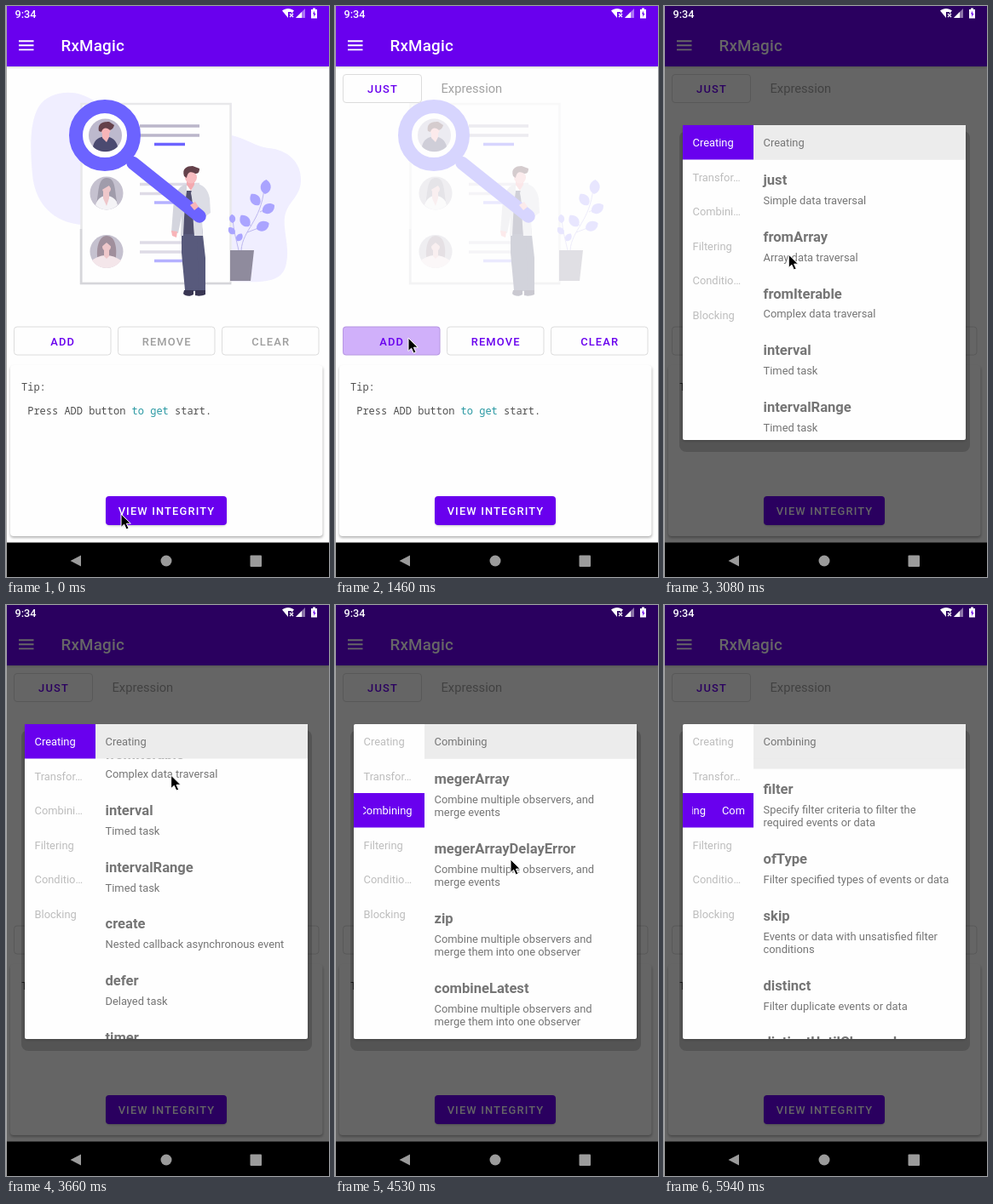
These frames come from a looping animation (379x671 px, 6040 ms). An HTML page:

```html
<!DOCTYPE html>
<html lang="en">
<head>
<meta charset="utf-8">
<title>RxMagic</title>
<style>
html, body { margin: 0; width: 100%; height: 100%; overflow: hidden; background: #fefefe; }
svg { display: block; width: 100vw; height: 100vh; font: 12.9px Roboto, sans-serif; }
text { white-space: pre; }
.btn { font-weight: 500; letter-spacing: 1.15px; text-anchor: middle; fill: #6900ee; }
.mono { font: 12px "Noto Sans Mono", monospace; fill: #505050; }
.box { fill: #fefefe; stroke: #dcdcdc; }
.name { font-size: 16.6px; font-weight: 700; }
#list, #sticky { fill: #757575; }
</style>
</head>
<body>
<svg viewBox="0 0 379 671">
  <defs>
    <clipPath id="listClip"><rect x="105" y="140" width="249" height="370"/></clipPath>
    <clipPath id="tabClip"><rect x="33" y="221" width="61.5" height="41"/></clipPath>
    <filter id="blur" x="-10%" y="-10%" width="120%" height="130%"><feGaussianBlur stdDeviation="1.5"/></filter>
    <path id="leaf" d="M0 0C-8-3-8-13 0-17C8-13 8-3 0 0Z" fill="#aaa4ff"/>
  </defs>
  <rect width="379" height="671" fill="#fefefe"/>

  <g id="art">
    <path id="blob" d="M88 257C55 254 34 232 31 198C28 165 28 137 38 119C48 102 72 99 88 104C100 108 108 116 120 114H265V152C282 156 293 165 308 167C332 169 347 185 346 206C345 225 330 230 327 248C325 264 333 283 329 302C325 325 305 325 265 324V257Z" fill="#f0eeff"/>
    <rect x="88.500" y="115" width="175" height="211" fill="#fefefe" stroke="#e8e8ea" stroke-width="2.500"/>
    <path d="M88 262V326H264" fill="none" stroke="#d6d6da" stroke-width="2.500"/>
    <g id="rows"></g>
    <g>
      <circle cx="118" cy="220" r="19.500" fill="#c5c1cf"/>
      <path d="M106 233C109 222 107 202 118 202C130 202 127 220 131 233Z" fill="#a09cab"/>
      <path d="M105 234C107 226 113 223 118 223C124 223 130 227 131 234C124 241 112 241 105 234Z" fill="#f4f3f6"/>
      <path d="M114 217h7v9l-3 9-4-9Z" fill="#eec7ca"/><circle cx="118" cy="215" r="5" fill="#eec7ca"/>
      <path d="M111 217C109 203 126 203 125 217L121 211Z" fill="#a09cab"/>
    </g>
    <g>
      <circle cx="118" cy="288.500" r="19.500" fill="#c5c1cf"/>
      <path d="M108 300C105 288 108 270 118 270C129 270 131 287 128 300Z" fill="#a08f9c"/>
      <path d="M101 299C107 294 113 293 118 293C124 293 129 295 135 299C127 311 109 311 101 299Z" fill="#f4e6ea"/>
      <path d="M115 285h6v9l-3 3-3-3Z" fill="#eec7ca"/><circle cx="118" cy="283" r="5" fill="#eec7ca"/>
      <path d="M111 284C109 272 127 272 125 284L118 278Z" fill="#a08f9c"/>
    </g>
    <circle cx="116.500" cy="152" r="27" fill="#fefefe"/>
    <circle cx="116.500" cy="152" r="19.500" fill="#bdb9cd"/>
    <path d="M102 165C104 156 110 154 117 153C124 154 129 157 131 165C124 173 109 173 102 165Z" fill="#4b4a70"/>
    <path d="M113 147h8v7l-3 6-5-5Z" fill="#f7b5b8"/><circle cx="117" cy="146" r="5.500" fill="#f7b5b8"/>
    <path d="M109 147C107 137 115 136 121 136L127 140C126 144 124 145 122 146C119 143 114 142 112 148Z" fill="#64414a"/>
    <circle cx="116" cy="152" r="34" fill="none" stroke="#6c63ff" stroke-width="16"/>

    <path d="M263 287H291L287 323H263Z" fill="#8f8b9d"/>
    <path d="M276 287C278 262 299 254 303 214M273 287C270 274 267 264 266 250M283 266L296 261M288 259L283 253M298 242L306 238" fill="none" stroke="#bdb8ef"/>
    <g id="leaves"></g>

    <path d="M206 260H230L234 296V335H221L213 300L213 334H210L206 290Z" fill="#585a7c"/>
    <path d="M207 262H224L226 335H213L207 300Z" fill="#585a7c"/>
    <path d="M209 334H220V339C216 342 210 341 208 338ZM222 334H234V339C230 341 224 341 222 340Z" fill="#393653"/>
    <path d="M208 217H222L223 268H206Z" fill="#51506f"/>
    <path d="M212 209C201 212 197 222 196 240L194 266L202 267L206 247L205 270H208C209 248 210 231 212 218Z" fill="#d4d5de"/>
    <path d="M220 208C231 209 237 215 239 226L240 243L230 250L231 270H221C219 252 220 232 217 220Z" fill="#dcdde5"/>
    <path d="M212 200h9v10l-4 7-5-7Z" fill="#f4a9af"/><circle cx="217" cy="201.500" r="7" fill="#f8bcc0"/>
    <path d="M209 200C206 191 212 188 219 188L227 191C227 196 225 197 222 197C218 194 213 194 212 202Z" fill="#64414a"/>
    <path d="M194 264l7 1-1 7-5-2Z" fill="#f8b4b8"/>
    <path d="M149 184.500L227 247" stroke="#6c63ff" stroke-width="15.500" stroke-linecap="round"/>
    <path d="M216 234l6-4 4 6-5 4Z" fill="#f8b4b8"/>
  </g>

  <g id="row">
    <rect class="box" x="9.500" y="80.500" width="92" height="33" rx="3.500"/>
    <text class="btn" x="56" y="101.700">JUST</text>
    <text x="124.500" y="102.300" font-size="14.700" fill="#a2a2a2">Expression</text>
  </g>
  <rect id="justTint" x="9" y="80" width="93" height="34" rx="4" fill="#6900ee"/>

  <g id="buttons"></g>
  <rect id="addTint" x="9" y="376.500" width="114.500" height="34" rx="4" fill="#6900ee"/>

  <rect x="5" y="424" width="367" height="201" rx="4" opacity=".28" filter="url(#blur)"/>
  <rect x="5" y="422" width="366.500" height="201" rx="4" fill="#fefefe"/>
  <text class="mono" x="18" y="452">Tip:</text>
  <text class="mono" x="25.200" y="479.700">Press ADD button <tspan fill="#2b99a3">to get</tspan> start.</text>
  <rect x="118" y="579" width="140" height="31.500" rx="4" opacity=".3" filter="url(#blur)"/>
  <rect x="117" y="576" width="142" height="34" rx="4" fill="#6900ee"/>
  <text class="btn" x="188.500" y="598.200" style="fill:#fff">VIEW INTEGRITY</text>

  <rect y="66" width="379" height="6" opacity=".2" filter="url(#blur)"/>
  <rect width="379" height="71" fill="#6900ee"/>
  <path d="M15 41.200H32.500M15 46.300H32.500M15 51.400H32.500" stroke="#fff" stroke-width="1.900"/>
  <text x="64.500" y="53" font-size="18.800" font-weight="500" letter-spacing=".2" fill="#fff">RxMagic</text>
  <rect id="dim" x="1" width="378" height="631"/>

  <g id="dialog">
    <rect x="18" y="147" width="341" height="377" rx="8" opacity=".17"/>
    <rect x="22" y="142" width="332" height="369" rx="2" opacity=".2" filter="url(#blur)"/>
    <rect x="22" y="140" width="332" height="370" rx="2" fill="#fefefe"/>
    <rect id="tabFill" x="22" width="83" height="40.500" fill="#6900ee"/>
    <g id="tabs"></g>
    <g id="marquee" clip-path="url(#tabClip)" fill="#fff"><text y="246.200">Combining</text><text y="246.200">Combining</text></g>
    <g clip-path="url(#listClip)"><g id="list"></g></g>
    <rect x="105" y="140" width="249" height="40.500" fill="#ececec"/>
    <text id="sticky" x="116.500" y="165.300"></text>
  </g>

  <g fill="#fff">
    <text x="10.500" y="13.700" font-size="12.700" font-weight="500">9:34</text>
    <path d="M324 5.500C328 2 334 2 338 5.500L335 9V7H331V12L331 14Z"/>
    <path d="M333 9L337 13M337 9L333 13" stroke="#fff" stroke-width="1.300"/>
    <path d="M351 3V14H340Z" opacity=".45"/><path d="M347 7V14H340Z"/>
    <path d="M358 4h2v-1.500h3V4h2V14.500H358Z"/>
  </g>
  <path d="M362 5.500L360 9.500H361.300V13L363.500 8.700H362Z" fill="#6900ee"/>
  <rect y="630.500" width="379" height="40.500"/>
  <g fill="#9b9b9b"><path d="M75.500 652L88 645.500V658.500Z"/><circle cx="188" cy="652" r="6.500"/><rect x="286.500" y="645.500" width="13.500" height="13.500" rx="1"/></g>
  <path d="M.5 0V671" stroke="#a8a8a8"/>
  <path id="cursor" d="M0 0V15.500L3.600 12.200L6.200 18L9 16.800L6.400 11.200H11.300Z" stroke="#fff"/>
</svg>
<script>
const $ = id => document.getElementById(id);
const LOOP = 6040, TAB = 40.5, TOP = 140;

// "|" splits the lines of a description
const sections = {
  Creating: [
    ["just", "Simple data traversal"], ["fromArray", "Array data traversal"],
    ["fromIterable", "Complex data traversal"], ["interval", "Timed task"],
    ["intervalRange", "Timed task"], ["create", "Nested callback asynchronous event"],
    ["defer", "Delayed task"], ["timer", "Delayed task"], ["range", "Sequence of events"]],
  Transforming: [
    ["map", "Data type conversion"], ["flatMap", "Unordered event conversion"],
    ["concatMap", "Ordered event conversion"], ["buffer", "Cache events before sending"]],
  Combining: [
    ["megerArray", "Combine multiple observers, and|merge events"],
    ["megerArrayDelayError", "Combine multiple observers, and|merge events"],
    ["zip", "Combine multiple observers and|merge them into one observer"],
    ["combineLatest", "Combine multiple observers and|merge them into one observer"],
    ["combineLatestDelayError", "Combine multiple observers and|merge them into one observer"],
    ["reduce", "Aggregate events and send"], ["collect", "Collect events into a container"],
    ["startWith", "Add new events before each source|event"],
    ["count", "Summarize the number of events sent"]],
  Filtering: [
    ["filter", "Specify filter criteria to filter the|required events or data"],
    ["ofType", "Filter specified types of events or data"],
    ["skip", "Events or data with unsatisfied filter|conditions"],
    ["distinct", "Filter duplicate events or data"],
    ["distinctUntilChanged", "Filter consecutive duplicate events"]]
};

const label = (x, y, s, attr = "") => `<text x="${x}" y="${y}" ${attr}>${s}</text>`;
const offset = {};
let y = 0, html = "";
for (const [section, items] of Object.entries(sections)) {
  offset[section] = y;
  html += `<rect x="105" y="${y}" width="249" height="${TAB}" fill="#ececec"/>` + label(116.5, y + 25.3, section);
  y += TAB;
  for (const [name, desc] of items) {
    const lines = desc.split("|");
    html += label(116.5, y + 29.8, name, 'class="name"');
    lines.forEach((s, i) => html += label(116.5, y + 52.7 + 15 * i, s));
    y += lines.length > 1 ? 82 : 66.6;
  }
}
$("list").innerHTML = html;

$("tabs").innerHTML = ["Creating", "Transfor…", "Combini…", "Filtering", "Conditio…", "Blocking"]
  .map((s, i) => label(33.5, 165.3 + TAB * i, s, 'fill="#bdbdbd"')).join("");
const tabs = $("tabs").children;

$("buttons").innerHTML = ["ADD", "REMOVE", "CLEAR"].map((s, i) =>
  `<rect class="box" x="${9.5 + 122 * i}" y="377" width="113.5" height="33" rx="3.5"/>` +
  label(66.7 + 122 * i, 398.7, s, 'class="btn"')).join("");
const captions = $("buttons").querySelectorAll("text");

$("rows").innerHTML = [141, 209.5, 278].map((y, i) =>
  `<path d="M157 ${y}h70m-70 11h70" stroke="${i ? "#dedbe6" : "#bbb6ca"}" stroke-width="3.3"/>` +
  `<path d="M174 ${y + 21.5}h36" stroke="${i ? "#b5b1ff" : "#6c63ff"}" stroke-width="3.3"/>`).join("");

$("leaves").innerHTML = [[304, 221, 5, 1], [297, 234, -35, .95], [301, 242, 60, .95], [285, 259, -35, .95],
  [294, 262, 65, .95], [266, 255, -5, .6], [268, 268, -40, .6], [271, 276, 35, .6]]
  .map(([x, y, a, s]) => `<use href="#leaf" transform="translate(${x} ${y}) rotate(${a}) scale(${s})"/>`).join("");

const path = [[50, 135, 597], [640, 204, 476], [1020, 86, 390], [1850, 86, 390], [2260, 73, 101], [2370, 78, 114],
  [2800, 78, 114], [3220, 180, 380], [3660, 194, 200], [4050, 62, 244], [4490, 206, 299], [4560, 206, 299],
  [5030, 229, 542], [5120, 231, 566], [5600, 240, 690]];

function cursorAt(t) {
  const i = path.findIndex(p => p[0] > t);
  if (i <= 0) return path[i ? path.length - 1 : 0].slice(1);
  const [a, b] = [path[i - 1], path[i]], u = (t - a[0]) / (b[0] - a[0]);
  return [1, 2].map(k => a[k] + (b[k] - a[k]) * u);
}

const FLING = 4540, REST = 5760;
const flingEnd = offset.Filtering - 12, flingSize = flingEnd - offset.Combining;
// Chosen so that 122 px remain at 5030 ms
const flingPower = Math.log(122 / flingSize) / Math.log((REST - 5030) / (REST - FLING));

function draw(t) {
  const ramp = (a, b) => Math.min(1, Math.max(0, (t - a) / (b - a)));
  const pulse = (a, b, c, d) => .31 * ramp(a, b) * (1 - ramp(c, d));
  const added = t >= 1400, picked = t >= 4100;

  $("art").style.opacity = 1 - ramp(1350, 1500);
  $("blob").style.opacity = 1 - ramp(1350, 1450);
  $("row").style.opacity = +added;
  for (const i of [1, 2]) captions[i].style.fill = added ? "#6900ee" : "#9e9e9e";
  $("addTint").style.opacity = pulse(1330, 1430, 1520, 1670);
  $("justTint").style.opacity = pulse(2620, 2710, 2850, 3000);

  const open = ramp(2880, 3030), size = .9 + .1 * open;
  $("dim").style.opacity = .6 * open;
  $("dialog").style.opacity = open;
  $("dialog").setAttribute("transform", `translate(188 325) scale(${size}) translate(-188 -325)`);

  const u = ramp(3250, 3830);
  const scroll = picked ? flingEnd - flingSize * (1 - ramp(FLING, REST)) ** flingPower : 205 * u * u * (3 - 2 * u);
  $("list").setAttribute("transform", `translate(0 ${TOP - scroll})`);
  $("sticky").textContent = picked ? "Combining" : "Creating";
  $("tabFill").setAttribute("y", TOP + (picked ? 2 * TAB : 0));
  tabs[0].setAttribute("fill", picked ? "#bdbdbd" : "#fff");
  tabs[2].style.opacity = +!picked;

  const shift = Math.max(0, 5 + (t - 4530) * .0295);
  $("marquee").style.opacity = +picked;
  [...$("marquee").children].forEach((e, i) => e.setAttribute("x", 33.5 - shift + 81 * i));

  $("cursor").setAttribute("transform", `translate(${cursorAt(t)})`);
}

function frame() {
  draw(Math.min(performance.now() % LOOP, 5940));
  requestAnimationFrame(frame);
}
frame();
</script>
</body>
</html>
```
